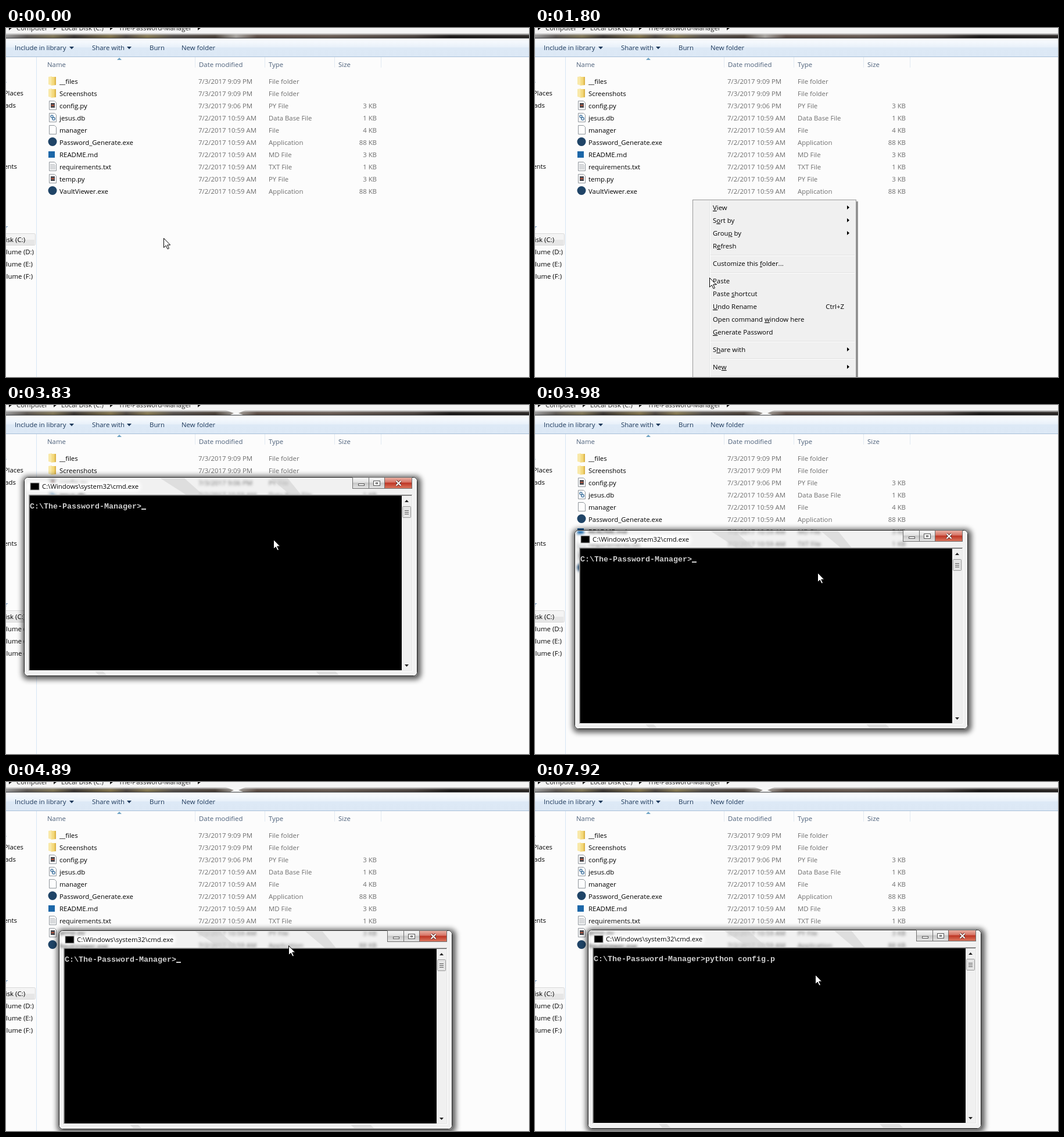
Animation, 900 px wide and 600 px high, one loop 8 s. Source, as an HTML page:

```html
<!DOCTYPE html>
<html lang="en">
<head>
<meta charset="utf-8">
<title>Folder and command window</title>
<style>
  html, body { margin: 0; width: 100%; height: 100%; overflow: hidden; background: #fcfcfc; }
  svg { display: block; width: 900px; height: 600px; }
  text { font: 11.4px "Open Sans", "Noto Sans", sans-serif; white-space: pre; }
  .bar text { fill: #1e395b; }
  .head text { fill: #4c607a; }
  .meta { fill: #6d6d6d; }
  .key { text-decoration: underline; }
  .console text { font: bold 13.333px "Liberation Mono", monospace; fill: #d0d0d0; }
  #pane { transform-origin: 338px 171px; }
  .soft { filter: blur(5px); }
  .glow { filter: blur(3px); }
  .frost { filter: blur(2px); }
</style>
</head>
<body>
<svg viewBox="0 0 900 600" id="stage">
  <defs>
    <linearGradient id="toolbar" x2="0" y2="1">
      <stop stop-color="#fafcfe"/><stop offset=".45" stop-color="#e9f1fa"/>
      <stop offset=".5" stop-color="#dde9f6"/><stop offset="1" stop-color="#dce8f5"/>
    </linearGradient>
    <linearGradient id="desk">
      <stop stop-color="#999"/><stop offset=".04" stop-color="#5b5652"/><stop offset=".09" stop-color="#7d7355"/>
      <stop offset=".13" stop-color="#3a3532"/><stop offset=".2" stop-color="#80724c"/><stop offset=".23" stop-color="#4d4640"/>
      <stop offset=".27" stop-color="#857852"/><stop offset=".32" stop-color="#55504c"/><stop offset=".4" stop-color="#4a4038"/>
      <stop offset=".44" stop-color="#a5a19c"/><stop offset=".48" stop-color="#5c4d45"/><stop offset=".62" stop-color="#675a52"/>
      <stop offset=".78" stop-color="#4a423e"/><stop offset=".85" stop-color="#1d1a19"/><stop offset="1" stop-color="#2c2826"/>
    </linearGradient>
    <linearGradient id="fade" x2="0" y2="1">
      <stop stop-color="#f4f4f4"/><stop offset=".25" stop-color="#ddd" stop-opacity=".8"/>
      <stop offset=".6" stop-color="#bbb" stop-opacity="0"/>
    </linearGradient>
    <linearGradient id="hoverFill" x2="0" y2="1">
      <stop stop-color="#fafcfe"/><stop offset="1" stop-color="#ebf3fd"/>
    </linearGradient>
    <linearGradient id="folder">
      <stop stop-color="#f7e08f"/><stop offset=".55" stop-color="#f3d777"/><stop offset="1" stop-color="#d5a93b"/>
    </linearGradient>
    <linearGradient id="button" x2="0" y2="1">
      <stop stop-color="#f7f7f7"/><stop offset=".45" stop-color="#e2e2e2"/>
      <stop offset=".5" stop-color="#c6c6c6"/><stop offset="1" stop-color="#e6e6e6"/>
    </linearGradient>
    <linearGradient id="close" x2="0" y2="1">
      <stop stop-color="#eab3a6"/><stop offset=".45" stop-color="#d67264"/>
      <stop offset=".5" stop-color="#bd3423"/><stop offset="1" stop-color="#dc7a62"/>
    </linearGradient>
    <clipPath id="frame"><rect x="-1" y="-1" width="677" height="342" rx="6"/></clipPath>
  </defs>
</svg>
<script>
const LOOP = 8000;
const stage = document.getElementById('stage');
const $ = id => document.getElementById(id);

const label = (x, y, str, attrs = '') => `<text x="${x}" y="${y}" ${attrs}>${str}</text>`;
const rect = (x, y, w, h, fill, attrs = '') =>
  `<rect x="${x}" y="${y}" width="${w}" height="${h}" fill="${fill}" ${attrs}/>`;
const path = (d, fill, attrs = '') => `<path d="${d}" fill="${fill}" ${attrs}/>`;
const line = (d, color, attrs = '') => path(d, 'none', `stroke="${color}" ${attrs}`);
const right = 'text-anchor="end"';

// Explorer window
const crumbs = [[18, 'Computer'], [95, 'Local Disk (C:)'], [194, 'The-Password-Manager']];
const address = rect(0, 0, 900, 18, 'url(#desk)') + rect(0, 8, 900, 9, 'url(#fade)') +
  path('M378 9h34l-12 5 8 3h-22l6-3z', '#f6f6f6', 'id="glint" opacity="0"') +
  rect(0, 0, 900, 9, '#f5f5f5') +
  crumbs.map(([x, s]) => label(x, 4, s, 'fill="#222"')).join('') +
  [5, 82, 179, 330].map(x => path(`M${x} -4l5 4-5 4z`, '#111')).join('') +
  rect(0, 17, 900, 1, '#33373c') + rect(0, 18, 900, 1, '#fff');

const down = x => path(`M${x} 32h8l-4 4.5z`, '#1e395b');
const toolbar = `<g class="bar">` + rect(0, 19, 900, 30, 'url(#toolbar)') + rect(0, 49, 900, 1, '#a8bfd8') +
  [[15, 'Include in library'], [148, 'Share with'], [247, 'Burn'], [302, 'New folder']]
    .map(([x, s]) => label(x, 38, s)).join('') + down(109) + down(208) + '</g>';

const nav = rect(52, 50, 1, 550, '#d6e5f5') +
  rect(-5.5, 353.5, 56, 20, '#f4f4f4', 'rx="2" stroke="#d9d9d9"') + rect(0, 364, 49, 9, '#e6e6e6') +
  [[1, 95, 'Favorites', '#1e5a96'], [30, 116, 'Recent Places'], [17, 137, 'Downloads'], [19, 242, 'Documents'],
   [3, 347, 'Computer', '#1e5a96'], [33, 368, 'Local Disk (C:)'], [48, 389, 'New Volume (D:)'],
   [46, 410, 'New Volume (E:)'], [46, 431, 'New Volume (F:)']]
    .map(([x, y, s, c = '#000']) => label(x, y, s, `${right} fill="${c}"`)).join('');

const sheet = path('M74.5 .5h9l3 3v12h-12z', '#fdfdfd', 'stroke="#8f959b"');
const icons = {
  folder: path('M73 1l6-1v16l-6-2z', '#f9e9a8') + path('M78 1h8v14l-8 1z', 'url(#folder)'),
  py: sheet + rect(77, 4, 7, 8, '#4a4a50') + rect(78, 7, 5, 2, '#b5543c'),
  db: sheet + `<g fill="none" stroke="#4c7ca5" stroke-width="1.5"><circle cx="79" cy="6" r="2"/><circle cx="82" cy="10" r="2.3"/></g>`,
  page: sheet,
  exe: '<circle cx="80" cy="7.5" r="7.5" fill="#1f4467"/>',
  md: rect(73, 3, 11, 11, '#1c67a8'),
  txt: sheet + line('M76 4.5h8m-8 2h9m-9 2h9m-9 2h9m-9 2h9', '#b4b8bc')
};
const older = '7/2/2017 10:59 AM';
const files = [
  ['folder', '__files', '7/3/2017 9:09 PM', 'File folder', ''],
  ['folder', 'Screenshots', '7/3/2017 9:09 PM', 'File folder', ''],
  ['py', 'config.py', '7/3/2017 9:06 PM', 'PY File', '3 KB'],
  ['db', 'jesus.db', older, 'Data Base File', '1 KB'],
  ['page', 'manager', older, 'File', '4 KB'],
  ['exe', 'Password_Generate.exe', older, 'Application', '88 KB'],
  ['md', 'README.md', older, 'MD File', '3 KB'],
  ['txt', 'requirements.txt', older, 'TXT File', '1 KB'],
  ['py', 'temp.py', older, 'PY File', '3 KB'],
  ['exe', 'VaultViewer.exe', older, 'Application', '88 KB']
];
const row = ([icon, name, date, type, size], i) => `<g transform="translate(0 ${83 + 21 * i})">` +
  icons[icon] + label(92, 13, name) + `<g class="meta">` +
  label(331, 13, date) + label(452, 13, type) + label(638, 13, size, right) + '</g></g>';

const list = `<g id="list"><g class="head">` +
  [[71, 'Name'], [332, 'Date modified'], [452, 'Type'], [572, 'Size']].map(([x, s]) => label(x, 67, s)).join('') +
  [325, 445, 565, 645].map(x => rect(x, 50, 1, 18, '#e1e9f2')).join('') +
  path('M191 55l4-4 4 4z', '#6fa3c4') + '</g>' + files.map(row).join('') + '</g>';

const hover = rect(68.5, 270.5, 573, 20, 'url(#hoverFill)', 'id="hover" rx="3" stroke="#b8d6fb" opacity="0"');

// Context menu; "_" marks the access key, ">" a submenu, "-" a separator
const entries = ['_View>', 'S_ort by>', 'Grou_p by>', 'R_efresh', '-', 'Customize this _folder...', '-',
  '_Paste', 'Paste _shortcut', '_Undo Rename', 'Open command _window here', '_Generate Password', '-',
  'S_hare with>', '-', 'Ne_w>', '-'];
const keyed = s => s.replace('>', '').replace(/_(.)/, '<tspan class="key">$1</tspan>');
let entryY = 313;
const entryMarkup = entries.map(s => {
  const y = entryY;
  entryY += s === '-' ? 8 : 22;
  if (s === '-') return rect(302, y - 11, 248, 1, '#e0e0e0') + rect(302, y - 10, 248, 1, '#fff');
  return label(306, y, keyed(s)) + (s.endsWith('>') ? path(`M537 ${y - 8}l4 3.5-4 3.5z`, '#000') : '');
}).join('');
const menu = `<g id="menu" opacity="0">` + rect(274, 298, 282, 310, '#000', 'opacity=".35"') +
  rect(553, 299, 2, 302, '#777', 'opacity=".5"') +
  rect(271.5, 295.5, 281, 310, '#f0f0f0', 'stroke="#979797"') +
  rect(300, 297, 1, 303, '#e2e3e3') + rect(301, 297, 1, 303, '#fff') +
  entryMarkup + label(532, 483, 'Ctrl+Z', right) + '</g>';
const pick = `<g id="pick" opacity="0">` +
  rect(274.5, 490.5, 275, 21, '#f3f7fd', 'rx="2" stroke="#aecff7"') +
  label(306, 505, keyed('Open command _window here')) + '</g>';

// Command window, drawn from the inside of its top left border
const typed = 'python config.p';
const prompt = 'C:\\The-Password-Manager&gt;';
const button = (x, w, fill) => rect(x + .5, -.5, w, 19, fill, 'stroke="#6d6d6d"');
const scrollbar = rect(649, 31, 17, 300, '#f0f0f0') + rect(649, 31, 1, 300, '#fafafa') +
  path('M654 42h7l-3.5-4z', '#222') + path('M654 321h7l-3.5 4z', '#222') +
  rect(650.5, 49.5, 14, 19, '#e4e4e4', 'rx="1" stroke="#979797"') +
  line('M654 56.5h7m-7 3h7m-7 3h7', '#555');
const sunkenEdge = line('M7.5 333V29.5H668', '#a0a0a0') + line('M8.5 332V30.5H667', '#696969') +
  line('M7 332.5H667.5V29', '#fff') + line('M8 331.5H666.5V30', '#e3e3e3');
const cross = 'M639.5 5.5l8 8m0-8l-8 8';
const cmd = `<g id="window"><g id="pane" opacity="0">` +
  rect(-4, -3, 686, 350, '#000', 'rx="9" class="soft" opacity=".65"') +
  `<g clip-path="url(#frame)">` + rect(-1, -1, 677, 342, '#f1f1f1') +
  `<g id="behind"><use href="#list" class="frost"/></g>` +
  path('M232 0h42l36 32h-28zM422 0h30l26 32h-18zM120 332h14l8 8h-14zM500 332h34l8 8h-34z', '#d3d3d3', 'opacity=".6"') +
  rect(2, 7, 198, 17, '#fff', 'rx="8" class="glow"') + '</g>' +
  rect(-.5, -.5, 676, 341, 'none', 'rx="6" stroke="#1c1c1c"') +
  rect(.5, .5, 674, 339, 'none', 'rx="5" stroke="#fff" stroke-opacity=".8"') +
  rect(10, 9, 15, 12, '#000', 'stroke="#999"') +
  label(30, 19, 'C:\\Windows\\system32\\cmd.exe') +
  button(564, 28, 'url(#button)') + button(592, 27, 'url(#button)') + button(619, 47, 'url(#close)') +
  rect(574.5, 10.5, 10, 3, '#fff', 'stroke="#555"') +
  rect(600.5, 5.5, 11, 8, '#fff', 'stroke="#555"') + rect(604.5, 8.5, 3, 2, '#ddd', 'stroke="#555"') +
  line(cross, '#5a2a26', 'stroke-width="4"') + line(cross, '#fff', 'stroke-width="2.2"') +
  rect(9, 31, 640, 300, '#000') + scrollbar + sunkenEdge +
  `<g class="console">` + label(9, 53, prompt + [...typed].map(c => `<tspan class="char">${c}</tspan>`).join('')) +
  rect(201, 53, 8, 2, '#d0d0d0', 'id="caret" opacity="0"') + '</g></g></g>';

const mouse = `<g id="mouse">` +
  path('M.5.5V16.5L4.2 13l2.9 6 2.4-1.1-2.8-5.9h5z', '#fff', 'stroke="#000"') + '</g>';

stage.insertAdjacentHTML('beforeend', rect(0, 0, 900, 600, '#fcfcfc') + nav + hover + list +
  address + toolbar + menu + pick + cmd + mouse);

// Every change is a hard step: [time, ...values]
function play(el, steps, toFrame) {
  const frames = steps.map(([t, ...v]) => ({ offset: t / LOOP, easing: 'step-end', ...toFrame(...v) }));
  frames.push({ ...frames[frames.length - 1], offset: 1 });
  el.animate(frames, { duration: LOOP, iterations: Infinity });
}
const opacity = o => ({ opacity: o });
const move = (x, y) => ({ transform: `translate(${x}px, ${y}px)` });

play($('hover'), [[0, 0], [120, .5], [250, 1], [530, .5], [650, 0]], opacity);
play($('menu'), [[0, 0], [1340, 1], [2320, 0]], opacity);
play($('pick'), [[0, 0], [2100, 1], [2470, .7], [2620, .45], [2770, .25], [2920, .1], [3070, 0]], opacity);
play($('glint'), [[0, 0], [2470, 1]], opacity);
play($('pane'), [[0, 0, .92], [2470, .6, .96], [2620, 1, 1]],
  (o, s) => ({ opacity: o, transform: `scale(${s})` }));

const drag = [[0, 8, 63], [3680, 10, 70], [3830, 32, 125], [3980, 69, 216], [4130, 99, 282],
  [4590, 97, 275], [4740, 93, 260], [4890, 92, 256], [5040, 92, 255]];
play($('window'), drag, move);
play($('behind'), drag, (x, y) => move(-x, -y));

play($('mouse'), [[0, 271, 361], [120, 271, 318], [250, 271, 283], [530, 271, 290], [650, 271, 295],
  [1650, 284, 350], [1800, 300, 429], [1950, 310, 475], [2100, 313, 497],
  [2770, 340, 425], [2920, 385, 290], [3070, 410, 183], [3380, 399, 78],
  [3530, 401, 85], [3680, 423, 140], [3830, 460, 231], [3980, 486, 288], [4130, 490, 299], [4440, 490, 297],
  [4590, 487, 281], [4740, 486, 279], [4890, 486, 281], [5040, 484, 305], [5190, 482, 331]], move);

play($('caret'), [[0, 0, 0], [3680, 1, 0], [4440, 0, 0], [4890, 1, 0], [5190, 0, 0], [6710, 1, 7], [6860, 0, 7]],
  (o, column) => ({ opacity: o, ...move(column * 8, 0) }));

// Each word is typed at its own even pace
const charTime = i => i < 7 ? 5650 + i * 126 : 6860 + (i - 7) * 151;
document.querySelectorAll('.char').forEach((el, i) =>
  play(el, [[0, 'hidden'], [charTime(i), 'visible']], visibility => ({ visibility })));
</script>
</body>
</html>
```
